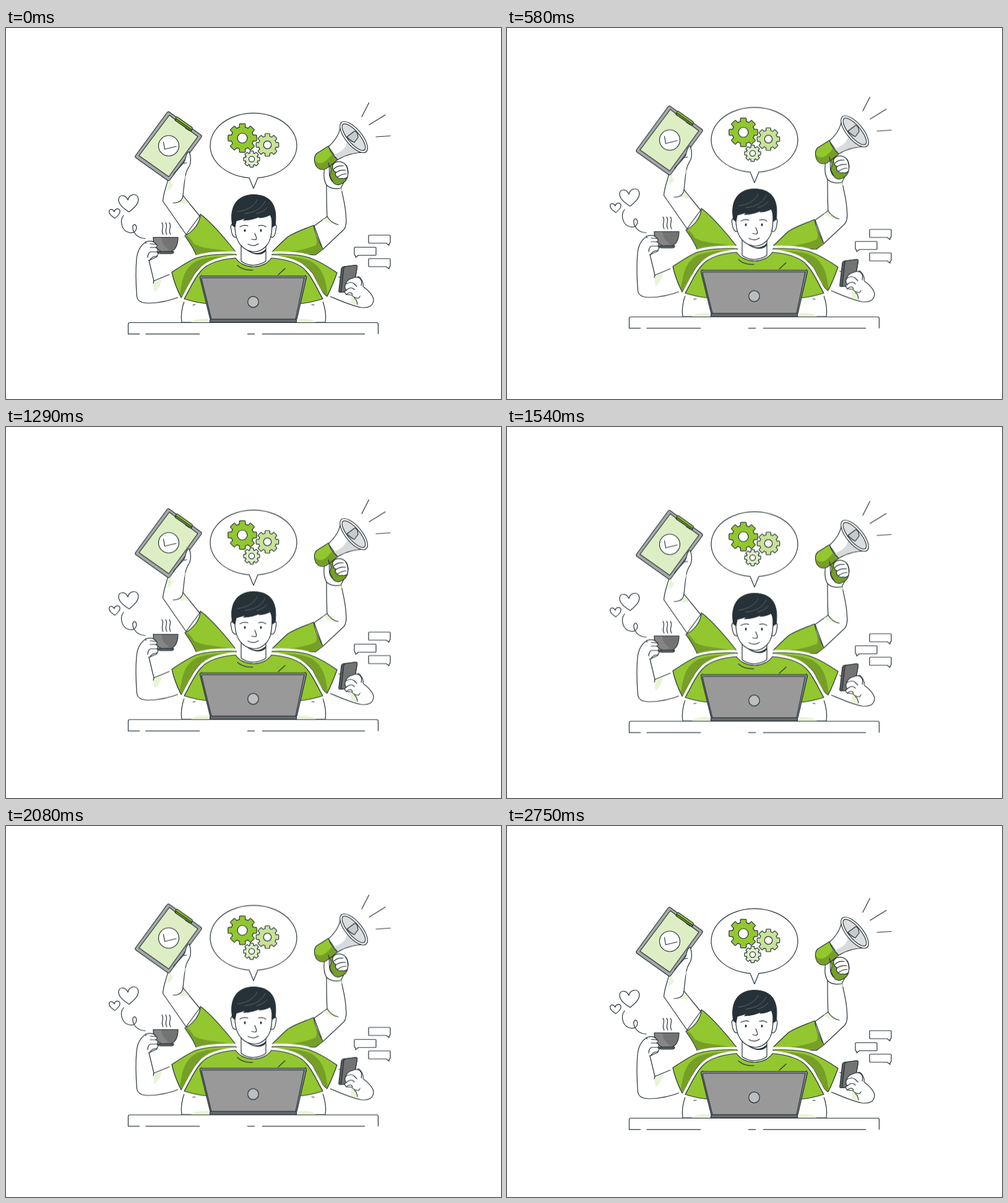
An HTML page without scripts that plays this animation: 800 px wide and 600 px high, repeating every 2.79 s.

```html
<!DOCTYPE html>
<html lang="en">
<head>
<meta charset="utf-8">
<title>Multitasking</title>
<style>
  html, body { margin: 0; width: 100%; height: 100%; overflow: hidden; background: #fff; }
  svg { display: block; width: 100%; height: 100%; }
  .scene {
    --ink: #263238; --green: #93c72f; --moss: #769f28; --pale: #deeec4; --mint: #e9f4d6;
    fill: none; stroke: var(--ink); stroke-width: 1.2;
    stroke-linecap: round; stroke-linejoin: round;
    animation: float 2790ms -5ms infinite;
  }
  /* a 1.5 s bob at 24 drawings a second, cut off after 67 drawings */
  @keyframes float {
    0%      { transform: translateY(0);     animation-timing-function: steps(18); }
    26.866% { transform: translateY(-12px); animation-timing-function: steps(18); }
    53.731% { transform: translateY(0);     animation-timing-function: steps(18); }
    80.597% { transform: translateY(-12px); animation-timing-function: steps(13); }
    100%    { transform: translateY(-3.33px); }
  }
  .white { fill: #fff; }
  .green { fill: var(--green); }
  .moss  { fill: var(--moss); }
  .pale  { fill: var(--pale); }
  .ink   { fill: var(--ink); }
  .flat  { stroke: none; }
  .mint  { fill: var(--mint); stroke: none; }
  .halo  { stroke: #fff; stroke-width: 9; }
  .rim   { fill: var(--ink); stroke-width: 2.4; }
  .cog * { vector-effect: non-scaling-stroke; }
</style>
</head>
<body>
<svg viewBox="0 0 800 600">
  <defs>
    <g id="cog" class="cog">
      <circle r="17.5"/>
      <g id="bars">
        <rect id="bar" x="-4.2" y="-22.6" width="8.4" height="45.2" rx=".6"/>
        <use href="#bar" transform="rotate(90)"/>
      </g>
      <use href="#bars" transform="rotate(45)"/>
    </g>
    <path id="sleeveL" d="M372 366 C346 365 323 367 307 372 C293 378 280 387 268 395 C271 409 276 422 283 436 C292 428 296 411 305 397 C318 377 345 373 372 370 Z"/>
    <path id="sleeveR" d="M430 366 C456 365 478 367 492 372 C508 378 522 387 535 396 C530 410 525 422 519 434 C508 427 504 411 496 397 C482 377 456 373 430 370 Z"/>
    <path id="torso" d="M371 372 C345 374 326 380 315 393 C303 406 296 425 288 438 C300 442 314 445 328 446 L332 472 H468 L472 446 C486 445 500 442 512 438 C504 425 497 406 485 393 C474 380 455 374 429 372 C423 381 412 386 400 386 C388 386 377 381 371 372 Z"/>
    <path id="note" d="M587 335 H620 Q621 335 621 336 V347 Q621 348 620 348 H619.500 L619 351.500 L614.500 348 H587 Q586 348 586 347 V336 Q586 335 587 335 Z"/>
    <path id="heart" d="M199 297.500 C190 292 182 286 182 278 C182 270 192 268 197 278 C199 269 209 267 213 273 C217 282 208 290 199 297.500 Z"/>
    <g id="forearm">
      <path class="white" d="M289 439 C285 450 282 464 284 476 H332 L326 446 Q304 445 289 439 Z"/>
      <path class="mint" d="M299 476 C308 468 318 471 329 470 V476 Z"/>
      <path d="M302 448 C310 446 319 446 326 448"/>
    </g>
  </defs>

  <g class="scene">
    <!-- raised arm with clipboard -->
    <path class="white" d="M263 239 C261 254 255 262 253.500 280 L291 334 L313 304 L286 271 L290 234 Z"/>
    <path class="mint" d="M263 247 L274 245 C270 254 268 261 261 263 Z M286 272 L296 284 L280 284 Z"/>
    <path d="M286 271 C285 279 279 283 270 283"/>
    <path class="green" d="M314 301 C331 313 358 345 371 362 C350 366 329 366 308 369 C303 355 296 346 289 336 C302 330 314 315 314 301 Z"/>
    <path class="moss flat" d="M289.500 336 C295 335 299 341 304 349 C320 358 343 357 367 362 C346 365 326 365 308.500 368 C304 355 297 346 289.500 336 Z"/>
    <path fill="#a6a8a9" d="M264 136 L315 173 Q317 175 315.500 177 L265 245.500 Q263 248 260.500 246 L210 210 Q208 208 209.500 206 L260 137 Q262 134.500 264 136 Z"/>
    <path class="pale" d="M264 141 L310 175.500 L263 240.500 L215 206.500 Z"/>
    <path class="white" d="M276 150 L281 154 Q284 156 286 154 Q291 154 291 159 Q289 163 292 163 L296 166 L299 163 L278 147 Z"/>
    <path class="green" d="M277 144 L301 161 Q302 163 299 167 L273 149 Q275 143 277 144 Z"/>
    <path class="moss" d="M275 147 L300 164.500 L299 167 L273.500 149.500 Z"/>
    <circle class="white" cx="263" cy="190.500" r="16.500"/>
    <path d="M254.500 184.500 L256.500 196 L275 191.500"/>
    <path class="white flat" d="M270 240 L289 214 Q291 201 296 200 Q299 208 298 216 C297 226 292 231 290 239 L286 255 L266 252 Z"/>
    <path d="M271 236 L286 219 C292 214 289 202 296 200 C299 208 299 216 297 222 C294 228 291 230 290 239 M286 219 L292 218"/>

    <!-- raised arm with megaphone -->
    <path class="white" d="M518 249 C518 270 518 288 519 305 L498 320 L512 358 L546 326 Q551 320 549.500 306 C549 285 543 270 540 249 Z"/>
    <path class="mint" d="M519 306 L537 318 C527 319 520 315 512 310 Z M530 256 L541 252 L543 264 Q535 264 530 256 Z"/>
    <path d="M519 305 Q526 316 537 318"/>
    <path class="green" d="M497 319 C483 325 467 330 455 338 C445 347 436 356 427 365 C450 368 478 365 500 367 L512 358 C505 345 499 333 497 319 Z"/>
    <path class="moss flat" d="M430 364 C456 362 483 360 501 351 C504 343 500 336 499 328 Q504 345 512 358 L500 366 C478 364 452 367 430 364 Z"/>
    <path class="white" d="M514 234 C514 222 520 218 524 217 L550 222 C555 232 553 240 548 246 L541 259 Q526 262 518 254 Q513 245 514 234 Z"/>
    <path class="moss" d="M523 222 L537 218 L552 240 Q551 249 540 253 Q533 255 529 250 L523 239 Q527 229 523 222 Z"/>
    <path class="white" d="M542 153 C540 170 533 181 521 192 L536 213 C550 204 564 201 581 201 Z"/>
    <path fill="#d8dadb" class="flat" d="M530 205 C545 198 549 195 552 182 Q565 195 579 200 C562 201 550 204 536 212 Z"/>
    <path class="green" d="M521 191 L502 203 C496 209 498 222 505 227 Q511 231 518 227 L536 213 Q526 205 521 191 Z"/>
    <path class="moss flat" d="M499 213 C505 223 516 219 526 205 L535 213 L518 226.500 Q511 230 505 226.500 Q499 222 499 213 Z"/>
    <g transform="translate(562 176.500) rotate(50)">
      <ellipse class="white" rx="31" ry="13"/>
      <ellipse fill="#dcdedf" rx="27" ry="9.500"/>
    </g>
    <path fill="#c8cbcc" d="M551 176 L563 167 Q566 166 568 171 L569 177 L563 185 Q556 182 551 176 Z"/>
    <path class="white" d="M528 222 C532 214 542 215 548 220 C553 226 553 235 552 241 Q548 245 543 243 Q538 245 535 241 Q531 238 533 233 Q527 231 528 222 Z"/>
    <path d="M530 228 Q535 222 545 223 M533 234 Q539 229 549 230 M536 241 Q542 236 550 236 M521 218 C525 229 519 238 527 248"/>
    <path d="M575 143.500 L586.500 121 M587 156.500 L613 140.500 M598 176 L621 174.500"/>

    <!-- thought bubble -->
    <path class="white" d="M407 242.300 A70 52.500 0 1 0 393 242.300 L400 259.500 Z"/>
    <g transform="translate(382 178)">
      <use href="#cog" class="rim"/><use href="#cog" class="green flat"/>
      <circle class="white" r="8"/>
    </g>
    <g transform="translate(422.500 189)">
      <g transform="scale(.78)"><use href="#cog" class="rim"/><use href="#cog" class="flat" fill="#c9e297"/></g>
      <circle class="white" r="6.300"/>
    </g>
    <g transform="translate(397 212)">
      <g transform="scale(.55)"><use href="#cog" class="rim"/><use href="#cog" class="pale flat"/></g>
      <circle class="white" r="4.600"/>
    </g>

    <!-- arm with cup -->
    <path class="white" d="M226 346 C217 352 212 362 211 374 C209 395 210 415 211.500 434 Q213 445 230 445 C250 445 268 440 285 433 L268 397 L239 409 L231 376 L244 370 L246 350 Z"/>
    <path class="mint" d="M238 411 L252 405 Q250 419 240 427 Z"/>
    <path d="M239 409 L238 413"/>
    <use href="#sleeveL" class="halo"/>
    <use href="#sleeveL" class="green"/>
    <path class="moss flat" d="M281 429 C285 412 285 391 306 378 C322 370 350 369 370 369 C345 373 318 377 305 397 C296 411 292 428 283.500 435 Z"/>
    <path fill="#737373" d="M238 338.500 H278 C278 350 274 360 266 361.500 H251 C242 358 238 350 238 338.500 Z"/>
    <path class="flat" fill="#858585" d="M239 339 H251 Q252 351 264 359 L252 361 C243 357 239 349 239 339 Z"/>
    <path fill="#5b5e60" d="M246 361.500 H271 Q271 365 267 365 H250 Q246 365 246 361.500 Z"/>
    <path class="white" d="M226 346 Q236 343 240 347 L243 350 Q246 353 242 355 Q248 358 244 362 Q248 366 243 369 Q236 369 232 376 L227 374 Z"/>
    <path class="white flat" d="M223 349 H230 V377 H223 Z"/>
    <path d="M233 349 L243 350 M233 355 H242 M234 362 H244 M229 371 C229 364 233 362 234 362"/>
    <path id="steam" d="M252 315 C257 321 249 326 254 334"/>
    <use href="#steam" x="6"/><use href="#steam" x="12"/>
    <use href="#heart" class="white"/>
    <use href="#heart" class="white" transform="translate(67.500 145.500) scale(.545)" style="stroke-width:2.2"/>
    <path d="M190 303 C183 312 187 329 200 331 C213 333 213 317 207 318 C201 321 207 340 225 340.500"/>

    <!-- arm with phone -->
    <path class="white" d="M532 400 L553 409 L570 402 C577 408 578 413 577 418 C587 425 594 434 594 440 Q593 454 574 452 C554 448 536 439 519 432 Z"/>
    <path class="mint" d="M558 430 L567 438 L567 449 L557 445 Z"/>
    <use href="#sleeveR" class="halo"/>
    <use href="#sleeveR" class="green"/>
    <path class="moss flat" d="M520 431 C517 412 515 391 494 378 C478 370 450 369 432 369 C456 373 482 377 496 397 C504 411 508 427 518.500 433 Z"/>
    <path fill="#595c5e" d="M545 386 L565 383.500 Q568 383.500 567.500 387 L561 424 Q560 426 558 426 L540 427.500 Q537 427 538 424 L542 389 Q543 386.500 545 386 Z"/>
    <path fill="#737373" d="M548 386 L565 383.500 Q568 383.500 567.500 387 L561 424 Q560 426 558 426 L544 427 Q541 427 542 424 L546 388 Z"/>
    <path class="white" d="M549 414 Q552 406 559 405 Q567 401 572 405 Q576 409 574 416 L577 425 L570 437 Q563 437 559 432 L550 431 Q545 427 550 424 Q546 420 549 414 Z"/>
    <path class="white flat" d="M569 415 L577 418 L579 429 L568 436 Z"/>
    <path d="M549 414 Q558 409 563 414 L567 418 M550 424 Q558 417 563 423 M550 431 Q557 425 560 431 M563 437 Q567 439 568 447"/>
    <g class="white">
      <use href="#note"/>
      <use href="#note" transform="matrix(-1 0 0 1 1184 19.500)"/>
      <use href="#note" y="38"/>
    </g>

    <!-- body -->
    <use href="#forearm"/>
    <use href="#forearm" transform="matrix(-1 0 0 1 800 0)"/>
    <use href="#torso" class="halo"/>
    <use href="#torso" class="green"/>
    <path d="M374 384 Q385 393 399 391.500 M316 400 L320 407 M451 389 L440 399 M484 400 L480 407"/>
    <path class="white" d="M380 346 V377 Q389 384 400 383.500 Q412 383 420 377 V346 Z"/>
    <path class="ink flat" d="M381 351 C390 363 409 370 420 357 V361 C412 370 394 368 381 351 Z"/>

    <!-- head -->
    <path class="white" d="M371 319 C365 314 362 319 364 326 C365 335 368 340 373 338 Z M430 319 C436 314 438 319 436 327 C435 336 432 340 428 338 Z"/>
    <path class="white" d="M370 300 V325 C371 338 374 347 382 354 Q391 362 402 362 C417 361 426 348 428 337 Q431 324 430 298 Z"/>
    <path class="ink" d="M366 319 C361 292 371 270 400 269.500 C429 270 439 288 435 319 L430 322 Q431 309 427 302 Q421 306 409 307 L413 303 Q402 310 384 311 L388 307 Q380 310 372 312 L370 322 Z"/>
    <path stroke="#626b70" stroke-width=".9" d="M374 297 C390 295 401 288 406 278 M386 300 C403 298 413 292 419 280 M405 300 Q417 297 422 290"/>
    <path d="M378 321.500 Q384 317.500 391 320 M408 320 Q415 317.500 420 321.500 M402 332 C404 337 407 342 402 342.500 L397 341.500 M391 349.500 Q400 354.500 408 349"/>
    <g class="ink flat">
      <ellipse cx="386" cy="327.500" rx="1.500" ry="2.300"/>
      <ellipse cx="412" cy="327.500" rx="1.500" ry="2.300"/>
    </g>

    <!-- laptop and desk -->
    <path fill="#8a8d8f" d="M316 401 H483 Q486 401 485.500 404 L470 471 H330 L313.500 404 Q313 401 316 401 Z"/>
    <path fill="#999" d="M318 404 H482 L468 471 H332 L316 406 Q316 404 318 404 Z"/>
    <circle cx="399.500" cy="443" r="8.800" fill="#bcbebf"/>
    <path fill="#696c6e" d="M331 471 H468 Q469.500 471 469.500 473 V476 H329.500 V473 Q329.500 471 331 471 Z"/>
    <path class="white" stroke-linecap="butt" d="M197.500 495 V479 Q197.500 476.500 200 476.500 H599 Q601.500 476.500 601.500 479 V495"/>
    <path stroke-linecap="butt" d="M197 494.800 H216 M225.500 494.800 H313 M390 494.800 H402 M414 494.800 H580"/>
  </g>
</svg>
</body>
</html>
```
